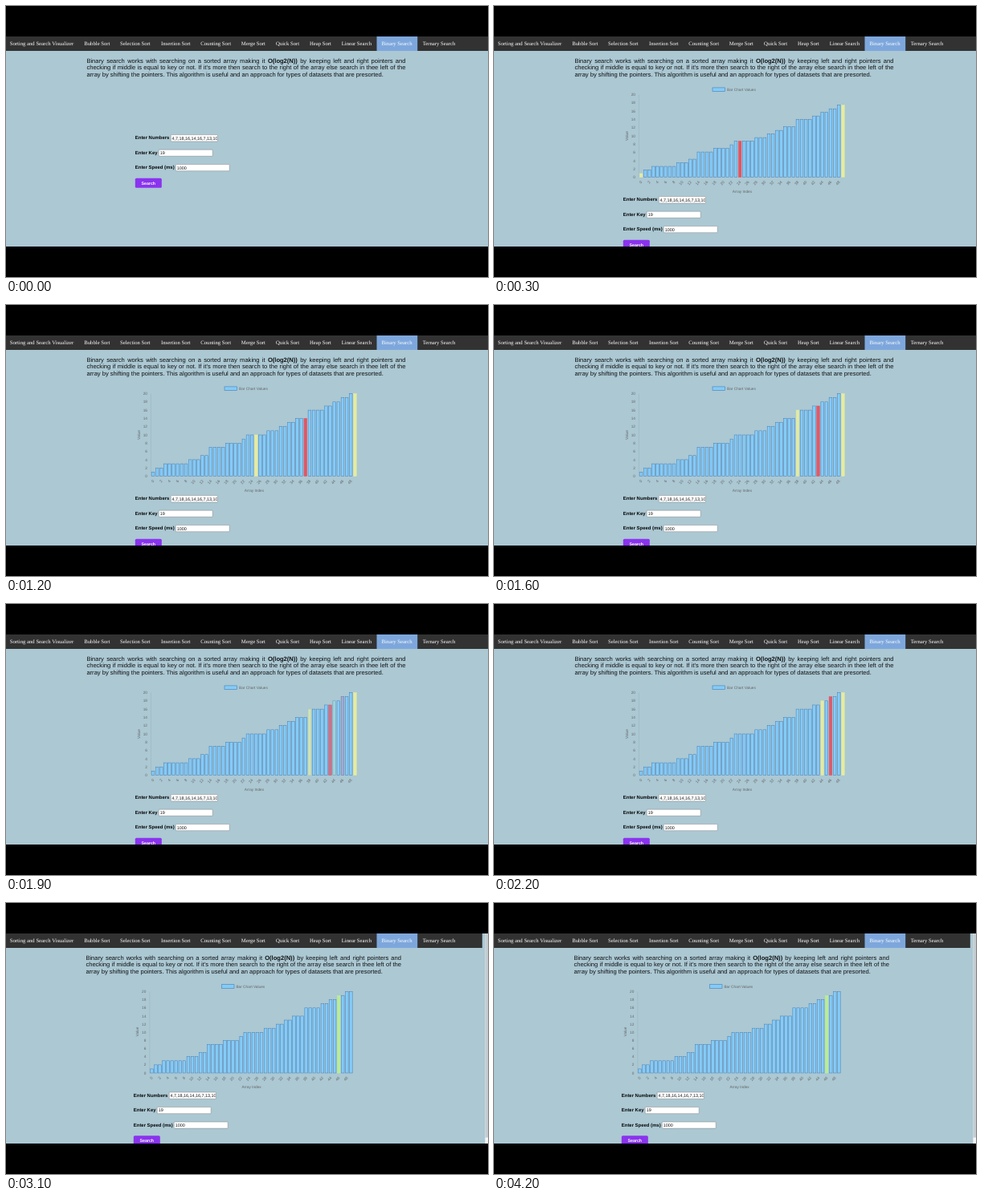
These frames come from a looping animation (600x338 px, 4.3 s). An HTML page:

```html
<!DOCTYPE html>
<html lang="en">
<head>
<meta charset="utf-8">
<title>Binary Search</title>
<style>
  html, body { margin: 0; width: 100%; height: 100%; overflow: hidden; background: #000; }
  #page {
    position: absolute; left: 0; top: 38px; width: 600px; height: 262px;
    overflow: hidden; background: #abc8d3;
  }
  svg, #intro { position: absolute; }
  svg { left: 0; top: 0; text-rendering: geometricPrecision; }
  text { font-family: "Liberation Sans", Arial, sans-serif; }
  #nav text { font: 6.7px "Liberation Serif", "Times New Roman", serif; fill: #fff; }
  #intro {
    top: 26.7px; color: #111; text-rendering: geometricPrecision;
    font: 7.57px/8.8px "Liberation Sans", Arial, sans-serif;
  }
  #intro div { white-space: nowrap; text-align: justify; text-align-last: justify; }
  #intro div:last-child { text-align-last: left; }
  #chart text { font-size: 4.75px; fill: #666; }
  #form text { font-size: 5.4px; fill: #111; }
  #form .label { font-size: 5.95px; font-weight: bold; fill: #080808; }
  #form .button { font-size: 5.25px; font-weight: bold; fill: #fff; }
</style>
</head>
<body>
<div id="page">
  <div id="intro">
    <div>Binary search works with searching on a sorted array making it <b>O(log2(N))</b> by keeping left and right pointers and</div>
    <div>checking if middle is equal to key or not. If it's more then search to the right of the array else search in thee left of the</div>
    <div>array by shifting the pointers. This algorithm is useful and an approach for types of datasets that are presorted.</div>
  </div>
  <svg width="600" height="262" viewBox="0 38 600 262">
    <g id="nav">
      <rect id="navBar" y="38" height="18" fill="#323232"/>
      <rect x="461.5" y="38" width="50.7" height="18" fill="#7da7dc"/>
    </g>
    <g id="chart"></g>
    <g id="form">
      <g fill="#fff" stroke="#767676" stroke-width=".45">
        <rect x="205.2" y="160.6" width="58.2" height="8.3" rx=".7"/>
        <rect x="190.2" y="179.2" width="67" height="8.1" rx=".7"/>
        <rect x="211.2" y="197.6" width="67" height="8.1" rx=".7"/>
      </g>
      <text class="label" x="160.8" y="166.3">Enter Numbers</text>
      <text class="label" x="160.8" y="184.9">Enter Key</text>
      <text class="label" x="160.8" y="203.4">Enter Speed (ms)</text>
      <clipPath id="field"><rect x="205.5" y="160" width="57.2" height="9"/></clipPath>
      <text x="206.6" y="166.6" clip-path="url(#field)">4,7,18,16,14,16,7,13,10</text>
      <text x="191.7" y="185.1">19</text>
      <text x="212.7" y="203.5">1000</text>
      <rect x="160.8" y="214.8" width="33" height="12" rx="1.5" fill="#8a33ee"/>
      <text class="button" x="177.3" y="222.7" text-anchor="middle">Search</text>
    </g>
    <g id="scrollbar">
      <rect x="596.4" y="38" width="3.6" height="262" fill="#f4f6f7"/>
      <rect x="596.4" y="38" width="3.6" height="254.5" fill="#c3cdd1"/>
    </g>
  </svg>
</div>
<script>
const LOOP = 4300, FADE = 600;
const $ = id => document.getElementById(id);

const menu = [["Sorting and Search Visualizer", 4.7], ["Bubble Sort", 97.3], ["Selection Sort", 142],
  ["Insertion Sort", 193], ["Counting Sort", 242.3], ["Merge Sort", 292.8], ["Quick Sort", 336],
  ["Heap Sort", 378], ["Linear Search", 417.7], ["Binary Search", 467.5], ["Ternary Search", 518.7]];
$("nav").insertAdjacentHTML("beforeend",
  menu.map(([name, x]) => `<text x="${x}" y="49.2">${name}</text>`).join(""));

// How many bars hold each value, in sorted order
const counts = { 1: 1, 2: 2, 3: 6, 4: 3, 5: 2, 7: 4, 8: 4, 9: 1, 10: 5, 11: 3, 12: 2,
  13: 2, 14: 3, 16: 4, 17: 2, 18: 2, 19: 2, 20: 2 };
const values = Object.entries(counts).flatMap(([v, n]) => Array(n).fill(+v));

const BLUE = [132, 203, 248], EDGE = [72, 124, 176];
const YELLOW = [230, 236, 160], RED = [224, 86, 101], GREEN = [186, 236, 150];

const steps = [
  { at: 60, left: 0, mid: 24, right: 49 },
  { at: 660, left: 25, mid: 37, right: 49 },
  { at: 1260, left: 38, mid: 43, right: 49 },
  { at: 1860, left: 44, mid: 46, right: 49 },
  { at: 2390, found: 46, instant: true }
];

// The narrow layout makes room for the scrollbar
const layouts = {
  wide: { x: 183, pitch: 5.13, base: 213.5, labelX: 176, legendX: 272, legendY: 104.2,
    valueX: 167.2, indexX: 309, formX: 0, formY: 77, introX: 100.4, introW: 397, navW: 600 },
  narrow: { x: 181.4, pitch: 5.06, base: 212, labelX: 174.4, legendX: 268.4, legendY: 104,
    valueX: 165.4, indexX: 305.6, formX: -2, formY: 75.4, introX: 99.4, introW: 392.6, navW: 592.8 }
};
const TOP = 110.5, BAR = 3.7;

const rgb = c => `rgb(${c.map(Math.round)})`;
const mix = (a, b, k) => a.map((v, i) => v + (b[i] - v) * k);
const easeOutQuart = k => 1 - (1 - Math.min(k, 1)) ** 4;

function highlight(step, i) {
  if (i === step.found) return GREEN;
  if (i === step.mid) return RED;
  if (i === step.left || i === step.right) return YELLOW;
}

function buildChart(l) {
  const unit = (l.base - TOP) / 20, axisX = l.x - l.pitch / 2;
  const out = [`<path d="M${axisX} ${TOP}V${l.base}" fill="none" stroke="#000" stroke-opacity=".1" stroke-width=".5"/>
    <rect x="${l.legendX}" y="${l.legendY - 2.3}" width="15.6" height="4.6"
    fill="${rgb(BLUE)}" stroke="${rgb(EDGE)}" stroke-width=".6"/>
    <text x="${l.legendX + 18}" y="${l.legendY + 1.7}">Bar Chart Values</text>
    <text text-anchor="middle" transform="translate(${l.valueX} ${l.base - 51.5}) rotate(-90)">Value</text>
    <text text-anchor="middle" x="${l.indexX}" y="${l.base + 19.1}">Array Index</text>`];
  for (let v = 0; v <= 20; v += 2)
    out.push(`<text text-anchor="end" x="${l.labelX}" y="${l.base - v * unit + 1.6}">${v}</text>`);
  for (let i = 0; i < 50; i += 2)
    out.push(`<text text-anchor="end" transform="translate(${l.x + i * l.pitch + 1.6} ${l.base + 6.2}) rotate(-50)">${i}</text>`);
  values.forEach((v, i) =>
    out.push(`<rect class="bar" x="${l.x + i * l.pitch - BAR / 2}" width="${BAR}" stroke-width=".5"/>`));
  $("chart").innerHTML = out.join("");
}

function drawBars(l, index, t) {
  const step = steps[index], previous = steps[index - 1];
  const k = step.instant ? 1 : easeOutQuart((t - step.at) / FADE);
  const growth = previous ? 1 : k;
  document.querySelectorAll(".bar").forEach((bar, i) => {
    const height = values[i] * (l.base - TOP) / 20 * growth;
    const now = highlight(step, i), before = previous ? highlight(previous, i) : now;
    bar.setAttribute("y", l.base - height);
    bar.setAttribute("height", height);
    bar.setAttribute("fill", rgb(mix(before || BLUE, now || BLUE, k)));
    bar.setAttribute("stroke", rgb(mix(before || EDGE, now || EDGE, k)));
  });
}

let current;
function setLayout(name, l, hasChart) {
  const key = name + hasChart;
  if (key === current) return;
  current = key;
  if (hasChart) buildChart(l);
  else $("chart").innerHTML = "";
  $("form").setAttribute("transform", hasChart ? `translate(${l.formX} ${l.formY})` : "");
  $("intro").style.left = l.introX + "px";
  $("intro").style.width = l.introW + "px";
  $("navBar").setAttribute("width", l.navW);
  $("scrollbar").style.display = name === "narrow" ? "" : "none";
}

const start = performance.now();
function frame() {
  const t = (performance.now() - start) % LOOP;
  const index = steps.filter(s => t >= s.at).length - 1;
  const name = index === 4 ? "narrow" : "wide";
  setLayout(name, layouts[name], index >= 0);
  if (index >= 0) drawBars(layouts[name], index, t);
  requestAnimationFrame(frame);
}
frame();
</script>
</body>
</html>
```
